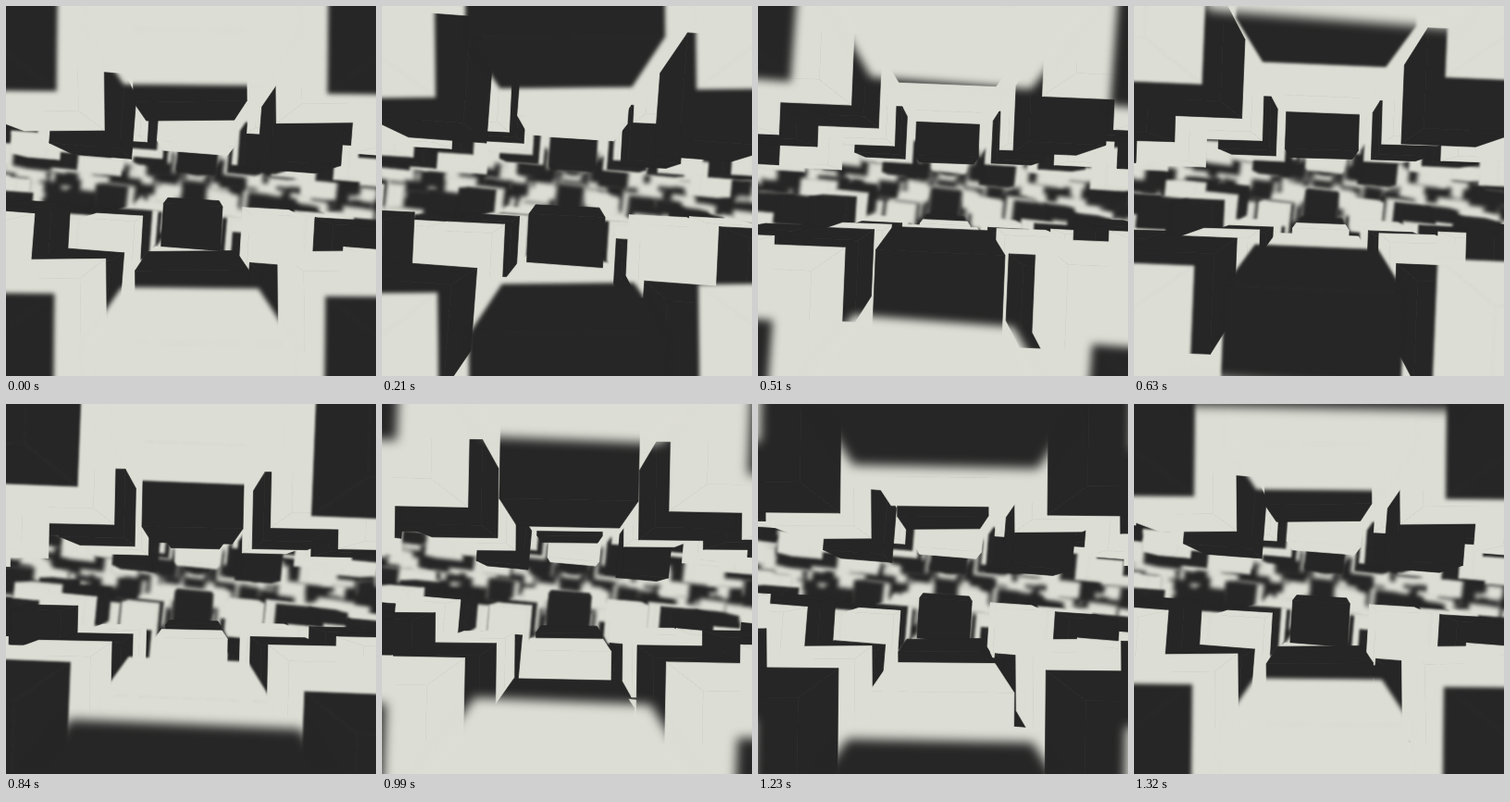
Animation, 400 px wide and 400 px high, one loop 1.35 s. Source, as an HTML page with a canvas:

```html
<!DOCTYPE html>
<html>
<head>
<meta charset="utf-8">
<style>
html, body { margin: 0; width: 100%; height: 100%; overflow: hidden; background: #dcddd4; }
canvas { display: block; width: 400px; height: 400px; }
</style>
</head>
<body>
<canvas id="stage" width="400" height="400"></canvas>
<script>
const LIGHT = '#dcddd4', DARK = '#262626';
const LOOP = 1350, STEP = 30, ROWS = 6;
const PAD = 30, SIZE = 400 + PAD * 2;
const DEPTH = 0.63, NEAR = 0.06, FAR = 28;

// vertical shift of each row in px: middle, left and right columns
const MID = [16, -5, -6, 12, -39, -20];
const LEFT = [-5, 3, 3, 24, -12, -11];
const RIGHT = [-5, 3, -3, 24, -31, 11];
const ROLL = [0.02, 0.01, -0.01, 0.075, 0.042, 0.04];

const stage = document.getElementById('stage').getContext('2d');
const makeLayer = () => {
  const c = document.createElement('canvas');
  c.width = c.height = SIZE;
  const g = c.getContext('2d');
  g.lineWidth = 0.7;
  g.lineJoin = 'round';
  return g;
};
const scene = makeLayer(), layer = makeLayer();

const clamp = (v, a, b) => Math.min(b, Math.max(a, v));
const smooth = (a, b, v) => {
  const k = clamp((v - a) / (b - a), 0, 1);
  return k * k * (3 - 2 * k);
};
const noise = (n, c) => {
  const v = Math.sin(n * 91.7 + c * 37.3 + 4.1) * 4375.85;
  return (v - Math.floor(v)) * 2 - 1;
};

function shiftOf(n, c, z) {
  const wild = noise(n, c) * 20;
  if (Math.abs(c) > 1) return wild;
  const near = (c < 0 ? LEFT : c > 0 ? RIGHT : MID)[n];
  const fade = 1 / (1 + Math.pow(Math.max(z, 0) / 9, 2));
  return near * fade + wild * smooth(6, 12, z);
}

function blurOf(z) {
  if (z < 2.3) return Math.min(6, 8 * (2.3 / z - 1));
  return clamp((z - 3.6) * 0.4, 0, 2.4);
}

function quad(g, view, pts) {
  g.beginPath();
  for (const [x, y, z] of pts) {
    const px = x / z, py = y / z + view.shift;
    g.lineTo(view.x + px * view.cos - py * view.sin,
             view.y + px * view.sin + py * view.cos);
  }
  g.closePath();
  g.fill();
  g.stroke();
}

function drawBox(g, view, c, side, z0, z1) {
  const half = c ? 118 : 133;
  const a = c * 372 - half, b = c * 372 + half;
  const y = side * (c ? 190 : 198), top = y + side * 250;
  const front = Math.max(z0, NEAR);
  quad(g, view, [[a, y, front], [b, y, front], [b, y, z1], [a, y, z1]]);
  if (c) {
    const x = c > 0 ? a : b;
    quad(g, view, [[x, y, front], [x, top, front], [x, top, z1], [x, y, z1]]);
  }
  if (z0 > NEAR) quad(g, view, [[a, y, z0], [b, y, z0], [b, top, z0], [a, top, z0]]);
}

function drawRow(g, i, d) {
  const n = ((i % ROWS) + ROWS) % ROWS;
  const z = i + 0.1 - d;
  const roll = ROLL[n] + (0.12 - ROLL[n]) * smooth(2, 9, z);
  const view = {
    x: PAD + 200 + 4 * smooth(2, 5, z), y: PAD + 200 - 5 * smooth(5, 12, z),
    cos: Math.cos(roll), sin: Math.sin(roll), shift: 0
  };
  const cols = Math.min(14, Math.ceil((z + DEPTH) * 240 / 372) + 1);
  for (let k = cols; k >= 0; k--) {
    for (const c of k ? [-k, k] : [0]) {
      const z0 = z + (c ? 0 : 0.07), z1 = z0 + DEPTH;
      if (z1 <= NEAR) continue;
      g.fillStyle = g.strokeStyle = (n + k) % 2 ? LIGHT : DARK;
      view.shift = shiftOf(n, c, z);
      drawBox(g, view, c, -1, z0, z1);
      drawBox(g, view, c, 1, z0, z1);
    }
  }
}

function stamp(to, from, blur) {
  to.filter = `blur(${blur.toFixed(2)}px)`;
  to.drawImage(from.canvas, 0, 0);
  to.filter = 'none';
}

function draw(ms) {
  const d = (ms % LOOP) / LOOP * ROWS;
  const first = Math.floor(d) - 1, last = first + FAR;
  scene.fillStyle = LIGHT;
  scene.fillRect(0, 0, SIZE, SIZE);

  // distant rows share one blurred layer
  layer.clearRect(0, 0, SIZE, SIZE);
  let i = last;
  for (; i + 0.1 - d > 10; i--) drawRow(layer, i, d);
  stamp(scene, layer, 2.4);

  for (; i >= first; i--) {
    const back = i + 0.1 - d + DEPTH;
    if (back + 0.07 <= NEAR) continue;
    const blur = blurOf(Math.max(back, 0.2));
    if (blur <= 0.15) {
      drawRow(scene, i, d);
    } else {
      layer.clearRect(0, 0, SIZE, SIZE);
      drawRow(layer, i, d);
      stamp(scene, layer, blur);
    }
  }
  stage.drawImage(scene.canvas, -PAD, -PAD);
}

let shown = -1;
function tick() {
  const step = Math.floor(performance.now() / STEP);
  if (step !== shown) draw((shown = step) * STEP);
  requestAnimationFrame(tick);
}
tick();
</script>
</body>
</html>
```
